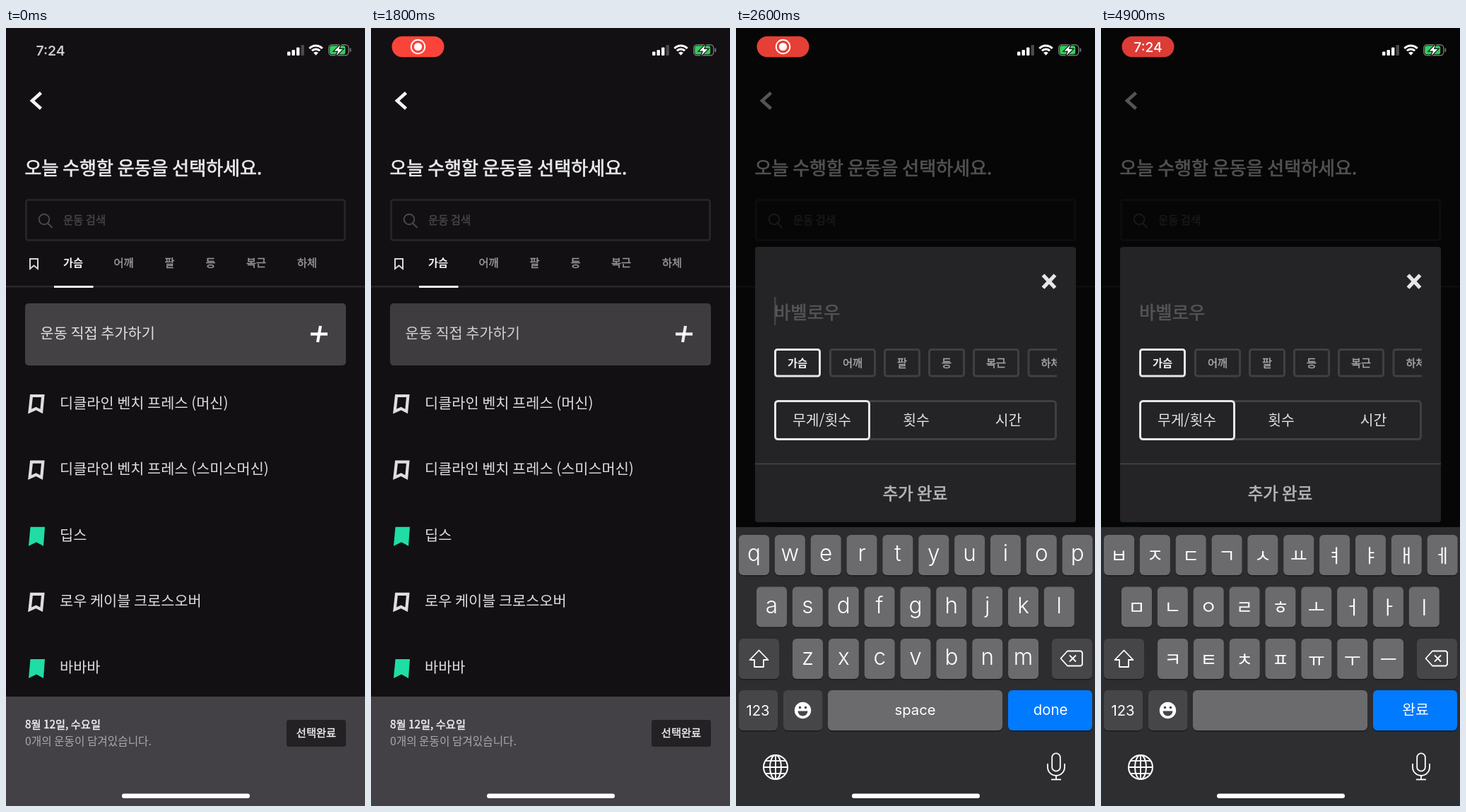
An HTML page with a canvas that plays this animation: 508 px wide and 1102 px high, repeating every 5 s.

```html
<!DOCTYPE html>
<html lang="ko">
<head>
<meta charset="utf-8">
<style>
html, body { margin: 0; width: 100%; height: 100%; overflow: hidden; background: #121013; }
canvas { display: block; width: 508px; height: 1102px; }
</style>
</head>
<body>
<canvas id="stage" width="508" height="1102"></canvas>
<script>
const ctx = document.getElementById('stage').getContext('2d');
const LOOP = 5000;
const KR = '"Noto Sans CJK KR", "Noto Sans CJK", "Noto Sans CJK JP", sans-serif';
const LATIN = 'Inter, Roboto, sans-serif';
const PARTS = ['가슴', '어깨', '팔', '등', '복근', '하체'];
const EXERCISES = ['디클라인 벤치 프레스 (머신)', '디클라인 벤치 프레스 (스미스머신)', '딥스', '로우 케이블 크로스오버', '바바바'];
const LAYOUTS = {
  en: ['qwertyuiop', 'asdfghjkl', 'zxcvbnm'],
  ko: ['ㅂㅈㄷㄱㅅㅛㅕㅑㅐㅔ', 'ㅁㄴㅇㄹㅎㅗㅓㅏㅣ', 'ㅋㅌㅊㅍㅠㅜㅡ']
};

const ramp = (t, from, to) => Math.min(1, Math.max(0, (t - from) / (to - from)));
const mix = (a, b, p) => Math.round(a + (b - a) * p);

// y is the visual middle of the glyphs
function text(s, x, y, size, color, { weight = 400, align = 'left', font = KR } = {}) {
  const base = y + size * 0.37;
  ctx.font = `${weight} ${size}px ${font}`;
  ctx.textAlign = align;
  ctx.fillStyle = color;
  ctx.fillText(s, x, base);
  // the Korean face has no medium cut, so thicken the regular one
  if (font === KR && weight === 500) {
    ctx.strokeStyle = color;
    ctx.lineWidth = size * 0.028;
    ctx.strokeText(s, x, base);
  }
}

function box(x, y, w, h, r, color) {
  ctx.beginPath();
  ctx.roundRect(x, y, w, h, r);
  ctx.fillStyle = color;
  ctx.fill();
}

function frame(x, y, w, h, r, color, line = 3) {
  ctx.beginPath();
  ctx.roundRect(x + line / 2, y + line / 2, w - line, h - line, r);
  ctx.strokeStyle = color;
  ctx.lineWidth = line;
  ctx.stroke();
}

function trace(points, closed) {
  ctx.beginPath();
  points.forEach(([x, y]) => ctx.lineTo(x, y));
  if (closed) ctx.closePath();
}

function line(points, color, width, closed = false) {
  trace(points, closed);
  ctx.strokeStyle = color;
  ctx.lineWidth = width;
  ctx.stroke();
}

function shape(points, color) {
  trace(points, true);
  ctx.fillStyle = color;
  ctx.fill();
}

function arc(x, y, r, color, width, from = 0, to = Math.PI * 2) {
  ctx.beginPath();
  ctx.arc(x, y, r, from, to);
  ctx.strokeStyle = color;
  ctx.lineWidth = width;
  ctx.stroke();
}

function disc(x, y, r, color) {
  ctx.beginPath();
  ctx.arc(x, y, r, 0, Math.PI * 2);
  ctx.fillStyle = color;
  ctx.fill();
}

function withAlpha(alpha, draw) {
  if (alpha <= 0) return;
  ctx.save();
  ctx.globalAlpha *= alpha;
  draw();
  ctx.restore();
}

function bookmark(y, filled) {
  if (filled) {
    shape([[34.5, y - 13], [55, y - 13], [53, y + 14], [43, y + 8.5], [32, y + 14]], '#1fdda4');
  } else {
    line([[36, y - 11.5], [52.3, y - 11.5], [50.2, y + 10.5], [42.5, y + 6.5], [33.6, y + 10.5]], '#dedddf', 4.2, true);
  }
}

function addButton() {
  box(27, 390, 454, 88, 5, '#434144');
  text('운동 직접 추가하기', 48.5, 432, 20.8, '#dedddf');
  line([[431, 433.5], [455, 433.5]], '#fff', 4.2);
  line([[445, 422], [441, 445]], '#fff', 4.2);
}

function listScreen(t) {
  line([[49.5, 91.8], [37, 103], [49.5, 114.2]], '#f4f4f4', 4.6);
  text('오늘 수행할 운동을 선택하세요.', 26.5, 198, 26, '#ebeaec', { weight: 500 });

  frame(27, 242, 454, 60, 3, '#252327');
  arc(54, 271, 7.3, '#4a484b', 2);
  line([[59, 276.5], [65.5, 283]], '#4a484b', 2);
  text('운동 검색', 81, 272, 15.4, '#464447', { weight: 500 });

  line([[34, 327], [45, 327], [45, 341], [39.5, 336.5], [34, 341]], '#d8d7d9', 2, true);
  const tabX = [81, 152.5, 224.5, 282.5, 340, 412];
  PARTS.forEach((s, i) => text(s, tabX[i], 332, 15.3, i ? '#9a999b' : '#f0eff1', { weight: i ? 500 : 700 }));
  box(0, 365, 508, 2.5, 0, '#29272a');
  box(68, 365, 55.5, 3, 0, '#f2f2f2');

  withAlpha(1 - 0.25 * ramp(t, 1750, 1900), addButton);

  EXERCISES.forEach((s, i) => {
    const y = 532.5 + 93.6 * i;
    bookmark(y, i === 2 || i === 4);
    text(s, 76, y - 1.5, 20.8, '#dedddf');
  });

  box(0, 947, 508, 155, 0, '#434145');
  text('8월 12일, 수요일', 27, 986, 15.3, '#f0eff1', { weight: 500 });
  text('0개의 운동이 담겨있습니다.', 27, 1010, 15.7, '#a9a8aa');
  box(397, 980, 84, 38, 3, '#232124');
  text('선택완료', 439, 998, 15.3, '#f0eff1', { weight: 500, align: 'center' });
}

function modal(t) {
  const mid = { align: 'center' };
  ctx.save();
  ctx.translate(0, 570 * (1 - ramp(t, 1900, 2200)) ** 3);
  box(27, 310, 454, 390, 4, '#242326');
  line([[434.5, 350], [451.5, 368]], '#e6e5e7', 5.4);
  line([[451.5, 350], [434.5, 368]], '#e6e5e7', 5.4);

  text('바벨로우', 54, 403, 25.4, '#555356', { weight: 500 });
  const phase = (t - 2000) / 1000 % 1;
  const blink = Math.max(1 - ramp(phase, 0.5, 0.62), ramp(phase, 0.91, 1));
  withAlpha(blink, () => box(54, 381, 2.6, 40, 0, '#e8e7e9'));

  ctx.save();
  ctx.beginPath();
  ctx.rect(52, 450, 402, 50);
  ctx.clip();
  const chips = [[54, 66], [132, 66], [209, 52], [272, 52], [335, 66], [412.5, 66]];
  chips.forEach(([x, w], i) => {
    frame(x, 454, w, 40.5, 3, i ? '#413f42' : '#e6e5e7');
    text(PARTS[i], x + w / 2, 474.5, 15.3, i ? '#a9a8aa' : '#f0eff1', { weight: i ? 500 : 700, align: 'center' });
  });
  ctx.restore();

  frame(54, 527, 400, 57, 4, '#413f42');
  frame(54, 527, 136, 57, 4, '#e6e5e7');
  text('무게/횟수', 121.5, 555, 20.4, '#e2e1e3', mid);
  text('횟수', 255, 555, 20.4, '#e2e1e3', mid);
  text('시간', 385.5, 555, 20.4, '#e2e1e3', mid);

  box(27, 616.5, 454, 1.8, 0, '#444245');
  text('추가 완료', 253.5, 659, 23.4, '#b5b4b6', { weight: 500, align: 'center' });
  ctx.restore();
}

function key(x, y, w, color) {
  box(x, y + 1.5, w, 57, 6, '#1c1b1d');
  box(x, y, w, 57, 6, color);
}

function keyIcons() {
  const white = '#fff';
  ctx.lineJoin = 'round';
  line([[32.5, 881.5], [45.5, 895], [39, 895], [39, 905], [26, 905], [26, 895], [19.5, 895]], white, 1.8, true);
  line([[459.5, 893], [469, 882.5], [488, 882.5], [490, 884.5], [490, 901.5], [488, 903.5], [469, 903.5]], white, 1.8, true);
  line([[472, 888.5], [481, 897.5]], white, 1.8);
  line([[481, 888.5], [472, 897.5]], white, 1.8);

  disc(94.5, 966.5, 11.7, white);
  disc(90.5, 962.5, 1.8, '#464548');
  disc(98.5, 962.5, 1.8, '#464548');
  ctx.beginPath();
  ctx.arc(94.5, 967.5, 7, 0, Math.PI);
  ctx.fill();

  arc(56, 1047, 17, white, 2);
  ctx.beginPath();
  ctx.ellipse(56, 1047, 8, 17, 0, 0, Math.PI * 2);
  ctx.stroke();
  line([[56, 1030], [56, 1064]], white, 1.8);
  line([[39, 1047], [73, 1047]], white, 1.8);
  line([[42, 1038], [70, 1038]], white, 1.8);
  line([[42, 1056], [70, 1056]], white, 1.8);

  frame(446.3, 1026.5, 13.4, 27, 5.7, white, 1.8);
  ctx.beginPath();
  ctx.moveTo(441, 1042);
  ctx.lineTo(441, 1047);
  ctx.arc(453, 1047, 12, Math.PI, 0, true);
  ctx.lineTo(465, 1042);
  ctx.stroke();
  line([[453, 1059], [453, 1064.5]], white, 1.8);
  line([[446, 1064.5], [460, 1064.5]], white, 1.8);
  ctx.lineJoin = 'miter';
}

function keyboard(t) {
  const korean = t >= 4000;
  const glow = 1 - ramp(t, 1900, 2100);
  const base = ctx.createLinearGradient(0, 880, 0, 1000);
  base.addColorStop(0, `rgb(${mix(45, 47, glow)},${mix(44, 46, glow)},${mix(47, 49, glow)})`);
  base.addColorStop(1, `rgb(${mix(46, 58, glow)},${mix(45, 57, glow)},${mix(48, 60, glow)})`);
  box(0, 707, 508, 395, 0, base);

  const rowX = [4, 29, 80], rowY = [718, 791.5, 865];
  LAYOUTS[korean ? 'ko' : 'en'].forEach((row, r) => [...row].forEach((ch, i) => {
    const x = rowX[r] + 50.85 * i;
    key(x, rowY[r], 43, '#6b6a6d');
    const style = { weight: korean ? 400 : 300, align: 'center', font: korean ? KR : LATIN };
    text(ch, x + 21.5, rowY[r] + (korean ? 29 : 25.5), korean ? 26 : 31.5, '#fff', style);
  }));

  const dark = '#464548';
  key(4, 865, 57, dark);
  key(447, 865, 57, dark);
  key(4, 938, 55, dark);
  key(67, 938, 55.5, dark);
  key(130, 938, 247, '#6b6a6d');
  key(385, 938, 119, '#007aff');

  const label = { align: 'center', font: korean ? KR : LATIN };
  text('123', 31, 966.5, 20.3, '#fff', { align: 'center', font: LATIN });
  text(korean ? '완료' : 'done', 445, 965, 20.4, '#fff', label);
  withAlpha(korean ? 1 - ramp(t, 4500, 4850) : 1, () =>
    text(korean ? '한국어' : 'space', 253.5, 965, 20.3, '#fff', label));
  keyIcons();
}

function statusBar(t) {
  const shown = ramp(t, 50, 350);
  const clock = ramp(t, 3050, 3300);
  const pulse = 0.5 + 0.5 * Math.cos((t - 2000) / 1900 * Math.PI * 2);
  withAlpha(1 - shown, () => text('7:24', 63, 32, 19.3, '#cbcacc', { weight: 600, align: 'center', font: LATIN }));
  withAlpha(shown, () => {
    box(29.5, 11.7, 74, 29.6, 14.8, `rgb(${mix(220, 255, pulse)},${mix(60, 69, pulse)},${mix(53, 58, pulse)})`);
    withAlpha(1 - clock, () => {
      arc(66.5, 26.5, 9.8, '#fff', 1.9);
      disc(66.5, 26.5, 5.6, '#fff');
    });
    withAlpha(clock, () => text('7:24', 66.5, 26.8, 19.3, '#fff', { weight: 500, align: 'center', font: LATIN }));
  });

  [5.5, 8, 11.5, 15].forEach((h, i) => box(398 + 6.5 * i, 39 - h, 4.4, h, 1, i < 3 ? '#fff' : '#4b4a4c'));

  const up = -Math.PI / 2, spread = 0.82;
  [12.5, 7.6].forEach(r => arc(438.5, 37.5, r, '#fff', 3, up - spread, up + spread));
  shape([[438.5, 38.8], [435, 35], [438.5, 33.6], [442, 35]], '#fff');

  frame(456, 23, 29.5, 16.5, 4.5, '#777678', 1.4);
  box(458.2, 25.2, 22, 12.1, 2.8, '#32cf5b');
  box(486.5, 28.5, 1.8, 5.5, 1, '#777678');
  const bolt = [[473, 24], [464.5, 32.5], [470, 32.5], [467.5, 39], [476.5, 30], [471, 30]];
  line(bolt, '#151316', 2.4, true);
  shape(bolt, '#fff');
}

function render(t) {
  box(0, 0, 508, 1102, 0, '#121013');
  listScreen(t);
  withAlpha(0.65 * ramp(t, 1850, 2100), () => box(0, 0, 508, 1102, 0, '#000'));
  if (t >= 1900) {
    modal(t);
    keyboard(t);
  }
  statusBar(t);
  box(164, 1084.5, 181, 6.5, 3.2, '#fff');
}

const start = performance.now();
function tick() {
  render((performance.now() - start) % LOOP);
  requestAnimationFrame(tick);
}
tick();
</script>
</body>
</html>
```
